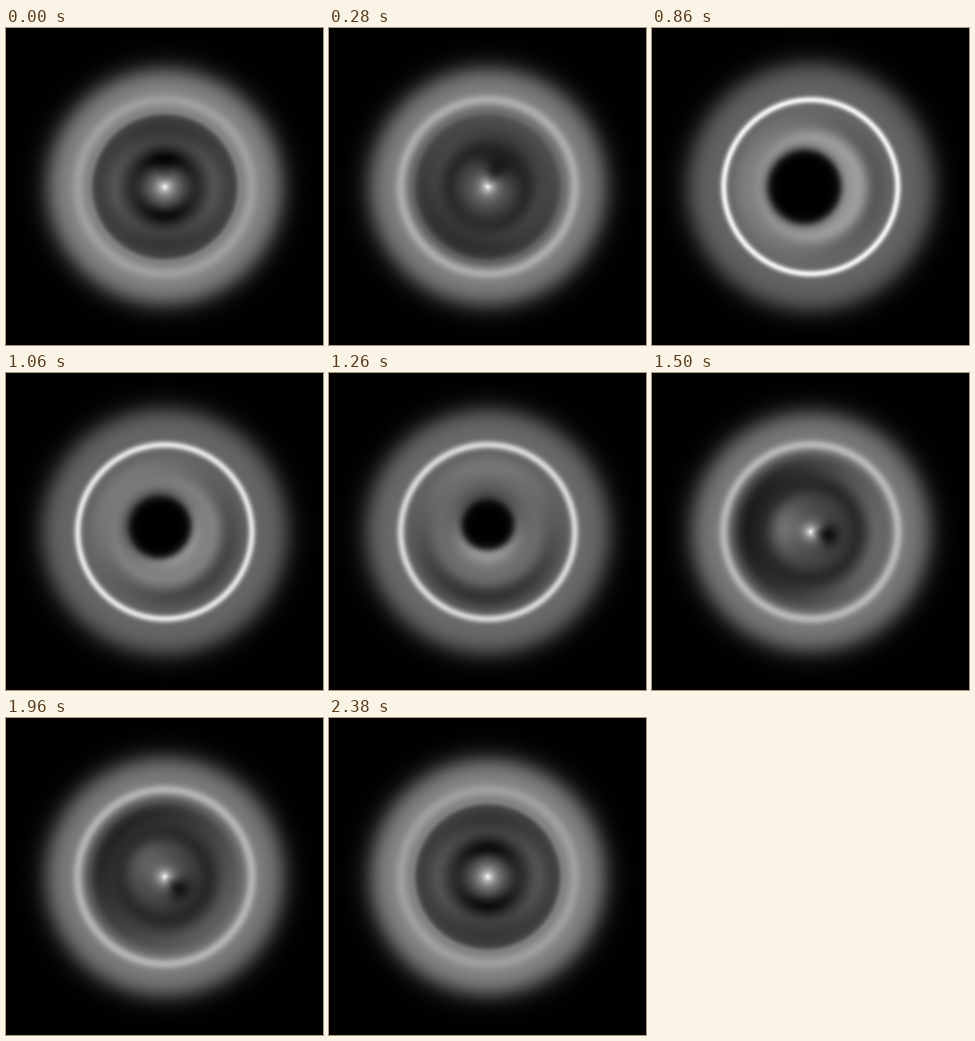
An HTML page with a canvas that plays this animation: 317 px wide and 317 px high, repeating every 2400 ms.

```html
<!DOCTYPE html>
<html lang="en">
<head>
<meta charset="utf-8">
<title>Breathing ring</title>
<style>
  html, body { margin: 0; height: 100%; overflow: hidden; background: #000; }
  canvas { display: block; }
</style>
</head>
<body>
<canvas id="stage" width="317" height="317"></canvas>
<script>
const SIZE = 317, CENTER = 158.3, REACH = 160, LOOP = 2400, STEP = 20;
const ctx = document.getElementById('stage').getContext('2d');
const image = ctx.createImageData(SIZE, SIZE);

// focus: sharpness of the ring, hole: its radius (negative when shut),
// heading: direction of the lean in degrees, lean: its strength.
const poses = [
  { time: 0, focus: 0, hole: -15, heading: -90, lean: 0.45 },
  { time: 560, focus: 0.35, hole: -15, heading: -38, lean: 1 },
  { time: 860, focus: 1, hole: 37, heading: -180, lean: 0.6 },
  { time: 1260, focus: 0.75, hole: 26, heading: -90, lean: 1 },
  { time: 1500, focus: 0.35, hole: -15, heading: 10, lean: 1 },
  { time: 1960, focus: 0.28, hole: -15, heading: 40, lean: 0.9 },
  { time: 2380, focus: 0, hole: -15, heading: -90, lean: 0 }
];
poses.push({ ...poses[0], time: LOOP });

const clamp = v => Math.max(0, Math.min(1, v));
const rise = v => 1 / (1 + Math.exp(-v));
const bell = v => Math.exp(-v * v);
const mix = (a, b, u) => a + (b - a) * u;

function poseAt(t) {
  const i = poses.findIndex(p => p.time > t), a = poses[i - 1], b = poses[i];
  const u = (t - a.time) / (b.time - a.time), eased = u * u * (3 - 2 * u);
  const pose = {};
  for (const key in a) pose[key] = mix(a[key], b[key], eased);
  return pose;
}

function shader({ focus, hole, heading, lean }) {
  const calm = clamp(1 - 3 * focus), opened = clamp(hole / 25), shut = 1 - opened;
  const full = focus ** 3, toward = heading * Math.PI / 180;

  // Everything that depends on the radius alone is worked out once per frame.
  const rings = Array.from({ length: REACH + 2 }, (_, r) => {
    const body = 62 + 40 * full
      + (20 * calm + 35 * full) * bell((r - 50) / 9)
      - 25 * shut * bell((r - 30 - 50 * focus) / 11);
    const halo = (135 - 36 * focus) * rise((117 + 6 * focus - r) / 6.5);
    return {
      base: mix(body, halo, rise((r - 74 - 9 * focus) / (2 + 6 * focus)))
        + (25 + 115 * focus) * bell((r - 87) / (6 - 2.5 * focus))
        + 20 * calm * bell((r - 74) / 3),
      glow: 190 * shut * Math.exp(-r / (9 - 6 * focus)),
      wave: 36 * lean * (1 - calm) * bell((r - 65) / 12),
      lobes: -32 * calm * (bell((r - 28) / 9) + 0.7 * bell((r - 53) / 10)),
      wedge: -65 * lean * shut * bell((r - 16) / 12),
      shine: 45 * lean * shut * (1 - calm) * bell((r - 28) / 15)
    };
  });

  return (r, angle) => {
    const i = Math.floor(r), f = r - i, a = rings[i], b = rings[i + 1];
    const at = key => mix(a[key], b[key], f);
    let level = at('base') + at('glow');
    if (r > 105) return level;
    const along = Math.cos(angle - toward);
    level += at('wave') * along + at('lobes') * along * along
      + at('wedge') * Math.exp(6 * (along - 1))
      + at('shine') * Math.exp(2 * (-along - 1));
    if (hole > -15) {
      const past = r - hole * (1 + 0.25 * lean * along);
      level += 130 * opened * lean * (1 - along) / 2 * Math.exp(-Math.max(0, past) / 14);
      level *= rise(past / 2.5);
    }
    return level;
  };
}

function draw(now) {
  const shade = shader(poseAt(Math.floor(now % LOOP / STEP) * STEP));
  for (let y = 0, n = 0; y < SIZE; y++) for (let x = 0; x < SIZE; x++, n += 4) {
    const dx = x - CENTER, dy = y - CENTER, r = Math.hypot(dx, dy);
    const level = r < REACH ? shade(r, Math.atan2(dy, dx)) : 0;
    image.data[n] = image.data[n + 1] = image.data[n + 2] = level;
    image.data[n + 3] = 255;
  }
  ctx.putImageData(image, 0, 0);
}

const start = performance.now();
function frame(now) {
  draw(Math.max(0, now - start));
  requestAnimationFrame(frame);
}
requestAnimationFrame(frame);
</script>
</body>
</html>
```
